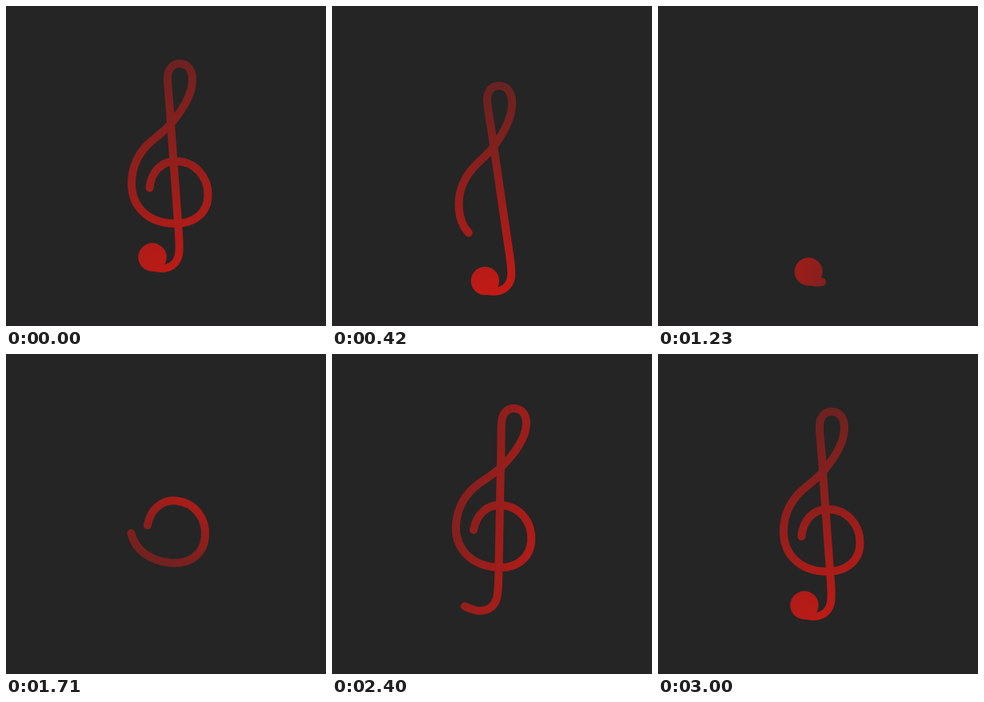
An HTML page that plays this animation: 400x400 px, repeating every 3.03 s.

```html
<!DOCTYPE html>
<html lang="en">
<head>
<meta charset="utf-8">
<title>Treble clef</title>
<style>
  html, body { margin: 0; width: 100%; height: 100%; overflow: hidden; background: #252525; }
  svg { display: block; width: 100%; height: 100%; }
</style>
</head>
<body>
<svg viewBox="0 0 400 400">
  <defs>
    <linearGradient id="ink" gradientUnits="userSpaceOnUse">
      <stop offset="0" stop-color="#622322"/>
      <stop offset="1" stop-color="#c41a15"/>
    </linearGradient>
  </defs>
  <rect width="400" height="400" fill="#252525"/>
  <rect y="398" width="400" height="2" fill="#28242a"/>
  <g id="clef">
    <path id="line" pathLength="1" fill="none" stroke="url(#ink)" stroke-width="10"
      stroke-linecap="round" stroke-linejoin="round"
      d="M179.5 228C181 208 194 194 212 194C236 194 252.5 213 252.5 236
         C252.5 258 236 272 212 272C178 272 157 251 157 222
         C157 199 166 183 181 169.5C191 161 201 154 208 145
         C222 128 233 108 233 92C233 80 227 72 217 72
         C207 72 201.5 80 202 93C202.3 104 205 125 206 147
         L216 285C217 300 217 305 216 311C213 324 203 328 195 328C188 328 183 326 177 324"/>
    <circle id="ball" cx="183" cy="314" r="17.7" fill="url(#ink)"/>
  </g>
</svg>
<script>
const LOOP = 3030, CYCLE = 3000, BALL_RADIUS = 17.7;
const [clef, line, ball, ink] = ['clef', 'line', 'ball', 'ink'].map(id => document.getElementById(id));

const progress = (t, start, end) => Math.min(1, Math.max(0, (t - start) / (end - start)));
const easeInOut = x => x ** 1.75 / (x ** 1.75 + (1 - x) ** 1.75);

// Slightly slower in the middle, faster towards the end.
const sweep = x => x - 0.34 * x * x * (1 - x);

function pose(t) {
  const move = (start, end, amount) => amount * easeInOut(progress(t, start, end));
  const shift = move(0, 680, 41) + move(680, 1880, -55) + move(1880, 2850, 14);
  const tilt = move(0, 750, 6.9) + move(750, 2000, -13.9) + move(2080, CYCLE, 7);
  clef.setAttribute('transform', `translate(0 ${shift}) rotate(${-tilt} 200 200)`);
}

function draw(t) {
  const erasing = t < 1290;
  const from = erasing ? sweep(progress(t, 0, 1260)) : 0;
  const to = erasing ? 1 : sweep(progress(t, 1330, 2400));
  line.setAttribute('stroke-dasharray', `${to - from} 2`);
  line.setAttribute('stroke-dashoffset', -from);
  line.setAttribute('visibility', to > from ? 'visible' : 'hidden');

  const size = 1 - progress(t, 1230, 1330) + progress(t, 2410, 2700);
  ball.setAttribute('r', BALL_RADIUS * size);
}

// The dark side of the gradient circles the clef once per cycle.
function shade(t) {
  const u = progress(t, 0, CYCLE), turn = 2 * Math.PI * u;
  const angle = turn - 0.35 - 1.05 * (1 - u) * Math.sin(turn);
  const reach = 110 + 40 * Math.cos(turn);
  const offset = 10 - 10 * Math.cos(turn);
  const place = (index, distance) => {
    ink.setAttribute('x' + index, 200 + Math.sin(angle) * distance);
    ink.setAttribute('y' + index, 200 - Math.cos(angle) * distance);
  };
  place(1, offset + reach);
  place(2, offset - reach);
}

function render(t) {
  pose(t);
  draw(t);
  shade(t);
}

const began = performance.now();
function frame() {
  render((performance.now() - began) % LOOP);
  requestAnimationFrame(frame);
}
render(0);
requestAnimationFrame(frame);
</script>
</body>
</html>
```
